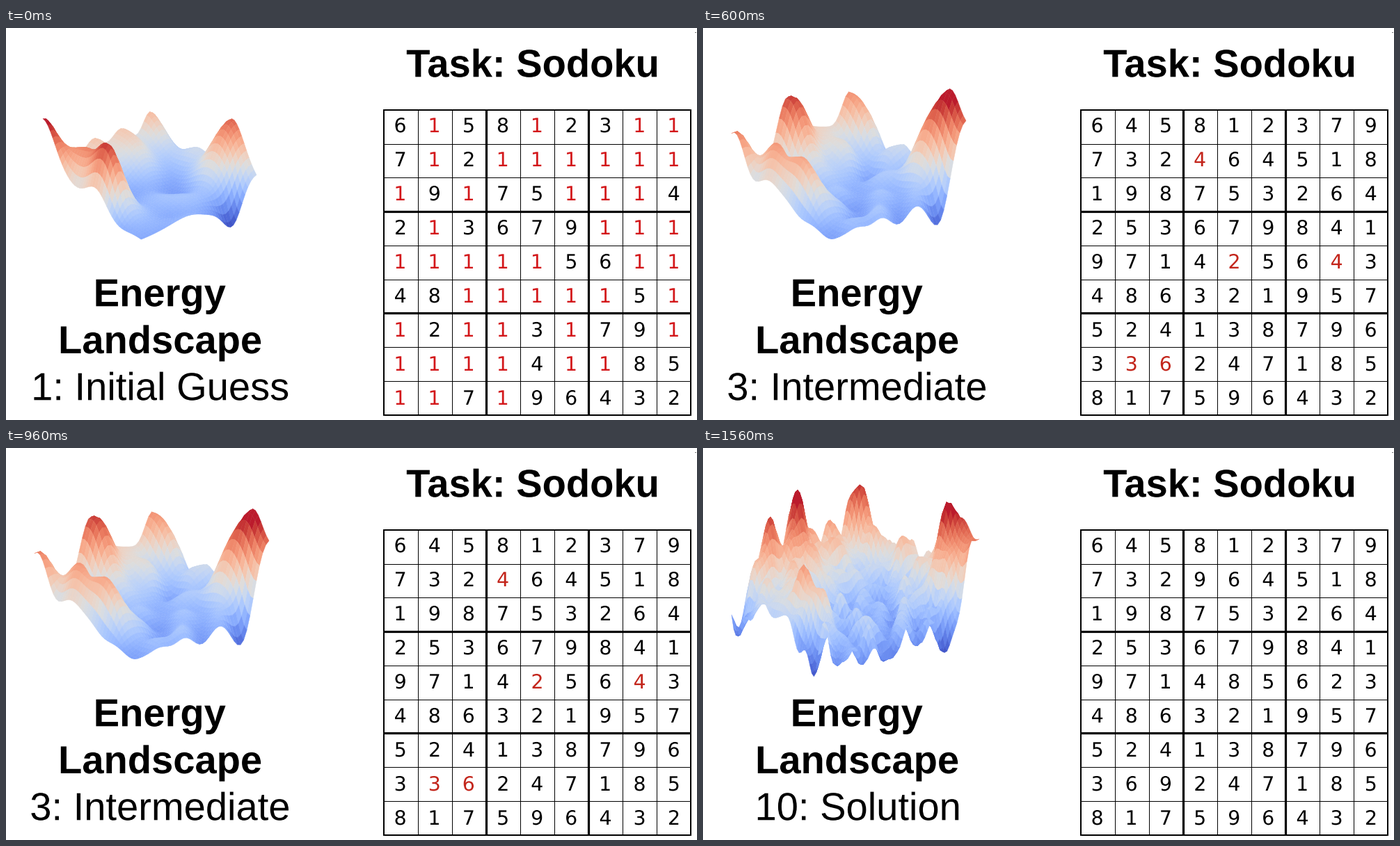
Recreate the animation shown at these times as a matplotlib script. Size 993x564 px, loop 1.8 s.

```python
import numpy as np
import matplotlib.pyplot as plt
from matplotlib.animation import ArtistAnimation
from matplotlib.collections import PolyCollection
from matplotlib.patches import PathPatch, Rectangle
from matplotlib.textpath import TextPath
from matplotlib.transforms import Affine2D

W, H, DPI = 993, 564, 64
PX = 72 / DPI  # points per pixel

fig = plt.figure(figsize=(W / DPI, H / DPI), dpi=DPI, facecolor="white")
ax = fig.add_axes([0, 0, 1, 1])
ax.set_xlim(0, W)
ax.set_ylim(H, 0)
ax.axis("off")

SANS = {"family": "Liberation Sans"}
BOLD = {"family": "Liberation Sans", "weight": "bold"}
DIGIT = {"family": "DejaVu Sans"}
TEXT_SIZE = 56.1


def label(text, x, baseline, size, font, color="black"):
    """Text whose ink is centred on x."""
    path = TextPath((0, 0), text, size=size, prop=font)
    box = path.get_extents()
    move = Affine2D().scale(1, -1).translate(x - (box.x0 + box.x1) / 2, baseline)
    return ax.add_patch(PathPatch(move.transform_path(path), fc=color, lw=0))


# ---------------------------------------------------------------- puzzle
LEFT, TOP, RIGHT, BOTTOM = 543.4, 118, 983.5, 556.5

CLUES = ["6.58.23..", "7.2......", ".9.75...4",
         "2.3679...", ".....56..", "48.....5.",
         ".2..3.79.", "....4..85", "..7.96432"]
SOLVED = ["645812379", "732964518", "198753264",
          "253679841", "971485623", "486321957",
          "524138796", "369247185", "817596432"]
MISTAKES = {(1, 3): "4", (4, 4): "2", (4, 7): "4", (7, 1): "3", (7, 2): "6"}
BLANKS = {(r, c): "1" for r, row in enumerate(CLUES)
          for c, digit in enumerate(row) if digit == "."}


def draw_grid():
    ax.add_patch(Rectangle((LEFT, TOP), RIGHT - LEFT, BOTTOM - TOP, fill=False,
                           lw=2 * PX, joinstyle="miter", zorder=3))
    for i in range(1, 9):
        x = LEFT + (RIGHT - LEFT) * i / 9
        y = TOP + (BOTTOM - TOP) * i / 9
        style = dict(color="black", lw=(3.2 if i % 3 == 0 else 1) * PX,
                     solid_capstyle="butt")
        ax.plot([x, x], [TOP, BOTTOM], **style)
        ax.plot([LEFT, RIGHT], [y, y], **style)


def draw_digits(wrong, red):
    """wrong maps a cell to the digit shown there in red."""
    return [label(wrong.get((r, c), digit), 566.6 + 49.13 * c,
                  150 + 49 * r, 28.4, DIGIT,
                  red if (r, c) in wrong else "black")
            for r, row in enumerate(SOLVED) for c, digit in enumerate(row)]


# ------------------------------------------------------------- landscape
# The ground is a tilted square: p runs from the left corner to the front
# one, q from the left corner to the back one.
# Hills: p, q, spread in p, spread in q, height in each of the three scenes.
HILLS = [
    (0.00, 0.00, 0.14, 0.10, (105, 75, 0)),     # left corner
    (0.28, 0.12, 0.13, 0.09, (60, 62, 36)),     # front ridge
    (0.55, 0.10, 0.12, 0.08, (90, 70, 72)),
    (0.63, 0.00, 0.08, 0.06, (-5, -22, -55)),   # gap below the ridge
    (0.00, 0.24, 0.14, 0.07, (40, 10, 95)),     # back left range
    (0.00, 0.44, 0.18, 0.08, (50, 110, 112)),
    (0.00, 0.67, 0.18, 0.10, (50, 58, 75)),
    (0.00, 0.93, 0.16, 0.07, (55, 92, 118)),
    (0.42, 1.00, 0.09, 0.10, (20, 22, 62)),     # back right range
    (0.75, 1.00, 0.12, 0.14, (85, 85, 85)),
    (1.00, 1.00, 0.15, 0.12, (12, 105, 105)),
    (1.00, 0.80, 0.06, 0.08, (-45, -62, -55)),  # pit at the right
]


def ripples(p, q, seed, freq):
    """Sum of random plane waves with unit variance."""
    rng = np.random.default_rng(seed)
    waves = 0
    for _ in range(24):
        angle, phase = rng.uniform(0, 2 * np.pi, 2)
        f = freq * rng.uniform(0.4, 1)
        waves = waves + np.sin(
            2 * np.pi * f * (p * np.cos(angle) + q * np.sin(angle)) + phase)
    return waves / np.sqrt(12)


def corners(a):
    """The four corners of every mesh cell."""
    return np.stack([a[:-1, :-1], a[:-1, 1:], a[1:, 1:], a[1:, :-1]], axis=2)


def landscape(scene, left, width, rough, freq, gain, cells):
    axis = np.linspace(0, 1, cells + 1)
    p, q = np.meshgrid(axis, axis, indexing="ij")
    z = rough * ripples(p, q, 5 + scene, freq)
    for hp, hq, sp, sq, heights in HILLS:
        z += heights[scene] * np.exp(-((p - hp) / sp) ** 2 / 2
                                     - ((q - hq) / sq) ** 2 / 2)
    x = left + width * (0.46 * p + 0.54 * q)
    ground = 240 + 60 * p - 67 * q

    quads = np.stack([corners(x), corners(ground - z)], axis=-1).reshape(-1, 4, 2)
    heat = 0.26 + gain * corners(z).mean(axis=2).ravel()
    far_first = np.argsort(corners(ground).mean(axis=2).ravel(), kind="stable")
    colors = plt.get_cmap("coolwarm")(np.clip(heat, 0.02, 0.98))[far_first]
    return ax.add_collection(PolyCollection(
        quads[far_first], facecolors=colors, edgecolors=colors,
        linewidths=0.4 * PX), autolim=False)


# ----------------------------------------------------------------- scene
draw_grid()
label("Task: Sodoku", 755.5, 70.3, TEXT_SIZE, BOLD)
label("Energy", 222.5, 400.3, TEXT_SIZE, BOLD)
label("Landscape", 222.5, 468, TEXT_SIZE, BOLD)
ax.add_patch(Rectangle((990, 6), 2, 1.3, fc="#777777", lw=0))

# caption, its centre, red cells and their colour, landscape settings
scenes = [
    ("1: Initial Guess", 222.8, BLANKS, "#d3171a", (53, 307, 4, 3.5, 0.0070, 40)),
    ("3: Intermediate", 221.2, MISTAKES, "#c3251b", (41, 337, 6, 5, 0.0060, 40)),
    ("10: Solution", 223, {}, "black", (41, 356, 13, 9, 0.0055, 54)),
]

frames = []
for i, (caption, x, wrong, red, terrain) in enumerate(scenes):
    frames.append([label(caption, x, 535.3, TEXT_SIZE, SANS),
                   landscape(i, *terrain), *draw_digits(wrong, red)])

anim = ArtistAnimation(fig, frames, interval=600, repeat=True, repeat_delay=0)
plt.show()
```
